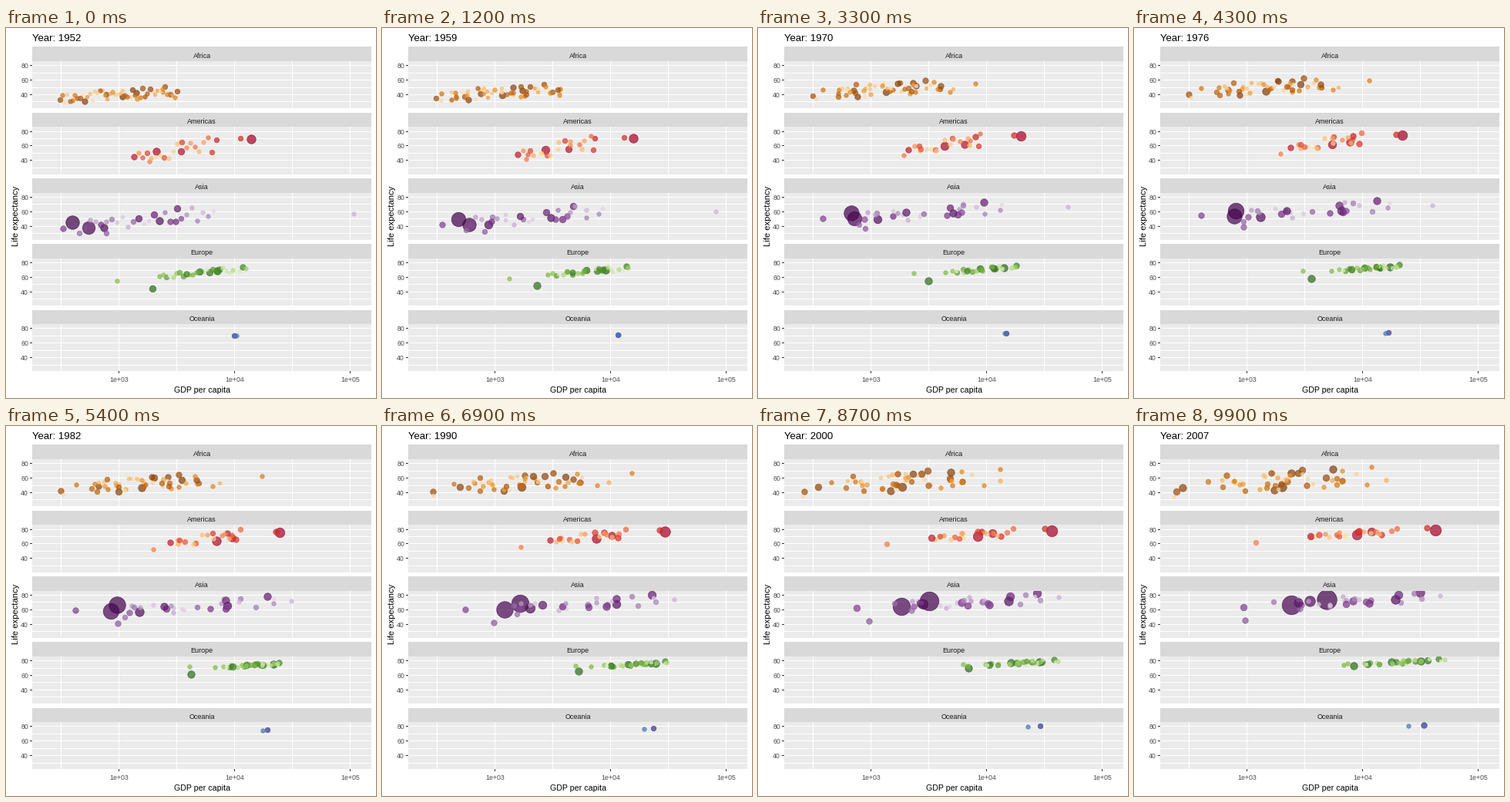
Write a matplotlib script that moves like this. It is 480x480 px and loops after 10000 ms.

```python
import numpy as np
import matplotlib.pyplot as plt
from matplotlib.animation import FuncAnimation
from matplotlib.colors import LinearSegmentedColormap
from matplotlib.patches import Rectangle

plt.rcParams["font.family"] = "Liberation Sans"
FRAMES, INTERVAL = 100, 100
KEYS = (1952, 1982, 2007)
START, END = KEYS[0], KEYS[-1]

LEFT, WIDTH = 34, 440.4
TOP, STRIP, PANEL, PITCH = 24.4, 18.6, 61.2, 85.3
BOTTOM = TOP + 4 * PITCH + STRIP + PANEL
X0, XSPAN = 2.2487, 2.9401      # log10 of GDP
YMAX, YSPAN = 85.55, 64.9       # years of life

rng = np.random.default_rng(7)
fig = plt.figure(figsize=(480 / 72, 480 / 72), dpi=72, facecolor="white")
ax = fig.add_axes([0, 0, 1, 1])
ax.set_xlim(0, 480)
ax.set_ylim(480, 0)
ax.axis("off")


def px(log_gdp):
    return LEFT + (log_gdp - X0) / XSPAN * WIDTH


def py(life, top):
    return top + (YMAX - life) / YSPAN * PANEL


def box(x0, y0, x1, y1, color):
    x0, y0, x1, y1 = (round(v) for v in (x0, y0, x1, y1))
    return ax.add_patch(Rectangle((x0, y0), x1 - x0, y1 - y0, fc=color, lw=0))


def text(x, y, s, size, color="black", ha="center", **kw):
    return ax.text(x, y, s, fontsize=size, color=color, ha=ha, va="baseline", **kw)


def spread(n):
    """Evenly spaced values of unit deviation in random order."""
    return rng.permutation(np.linspace(-1.7, 1.7, n))


def mix(a, b, share):
    return share * a + np.sqrt(1 - share ** 2) * b


def crowd(n, pops, gdp, gdp_dev, life, life_dev, link):
    """Random countries whose wealth and health drift with the continent."""
    if not n:
        return np.empty((0, 7))
    first, last, noise = spread(n), spread(n), spread(n)
    last = mix(first, last, 0.8)
    wealth = np.column_stack([first, (first + last) / 1.9, last])
    health = mix(wealth, noise[:, None], link)
    log_gdp = np.array(gdp) + wealth * gdp_dev
    years = np.minimum(np.array(life) + health * life_dev, 82)
    pop = rng.permutation(np.geomspace(*pops, n))
    return np.column_stack([pop, 10 ** log_gdp, years])


class Panel:
    """One facet: strip, grid and the dots of a continent."""

    def __init__(self, row, name, ramp, growth, leaders, n=0, **rule):
        strip = TOP + row * PITCH
        self.top = strip + STRIP
        self.draw_grid(strip, name)
        data = np.array(leaders, float)
        if n:
            data = np.vstack([data, crowd(n, **rule)])
        self.pop, self.growth = data[:, 0], growth
        self.gdp, self.life = np.log10(data[:, 1:4]), data[:, 4:]
        rank = (-self.pop).argsort().argsort()
        shades = LinearSegmentedColormap.from_list(name, ramp, N=512)
        colors = shades(rank / (len(rank) - 1))
        colors[:, 3] = 0.7
        self.dots = ax.scatter(rank, rank, facecolors=colors, edgecolors=colors,
                               linewidths=0.8, zorder=5)
        self.dots.set_clip_path(self.area)

    def draw_grid(self, strip, name):
        top, right = self.top, LEFT + WIDTH
        box(LEFT, strip, right, top, "#D9D9D9")
        self.area = box(LEFT, top, right, top + PANEL, "#EBEBEB")
        for v in np.arange(2.5, 5.5, 0.5):
            x = int(px(v))
            box(x, top, x + 1, top + PANEL, "white")
        for v in range(30, 90, 10):
            y = round(py(v, top))
            box(LEFT, y, right, y + 1, "white")
            if v % 20 == 0:
                box(LEFT - 3, y, LEFT, y + 1, "#333333")
                text(29, y + 3.7, str(v), 8.8, "#4D4D4D", "right")
        text(LEFT + WIDTH / 2, strip + 14.2, name, 9, "#1A1A1A")

    def update(self, year):
        weights = [np.interp(year, KEYS, row) for row in np.eye(3)]
        pop = self.pop * self.growth ** ((year - END) / (END - START))
        size = 2 + 10 * np.sqrt(pop / 1319)
        d = np.floor(0.75 * (size * 2.845 + 0.945) + 0.5)
        pos = np.column_stack([px(self.gdp @ weights), py(self.life @ weights, self.top)])
        self.dots.set_offsets(np.floor(pos) + 0.5)
        self.dots.set_sizes((d - 0.5) ** 2)


# Leaders: population in millions, then GDP and life expectancy at KEYS
panels = [
    Panel(0, "Africa", ["#7F3B08", "#B35806", "#E08214", "#FDB863", "#FEE0B6"], 3.8,
          [(135, 1077, 1577, 2014, 36, 46, 47),
           (80, 1419, 3504, 5581, 42, 56, 71),
           (65, 781, 674, 278, 39, 48, 46),
           (6, 2388, 17364, 12057, 43, 62, 74)],
          n=48, pops=(76, 0.2), gdp=(3, 3.2, 3.3), gdp_dev=(0.3, 0.34, 0.41),
          life=(39, 51.5, 55), life_dev=(5, 6.5, 9), link=0.5),
    Panel(1, "Americas", ["#A50026", "#D73027", "#F46D43", "#FDAE61", "#FEE090"], 2.2,
          [(301, 13990, 25010, 42952, 68, 75, 78),
           (190, 2109, 7031, 9066, 51, 63, 72),
           (109, 3478, 9611, 11978, 51, 67, 76),
           (33, 11367, 22899, 36319, 69, 76, 81),
           (8.5, 1840, 2011, 1202, 38, 51, 61)],
          n=20, pops=(44, 1), gdp=(3.49, 3.75, 3.89), gdp_dev=(0.21, 0.18, 0.22),
          life=(53, 66.5, 73), life_dev=(8, 5, 3), link=0.65),
    Panel(2, "Asia", ["#40004B", "#762A83", "#9970AB", "#C2A5CF", "#E7D4E8"], 2.6,
          [(1319, 400, 962, 4959, 44, 65, 73),
           (1110, 547, 856, 2452, 37, 57, 65),
           (224, 750, 1517, 3541, 37, 56, 71),
           (127, 3217, 19384, 31656, 63, 77, 83),
           (48, 331, 424, 944, 36, 58, 62),
           (32, 779, 978, 975, 29, 40, 44),
           (2.5, 108382, 31354, 47307, 56, 71, 78)],
          n=26, pops=(160, 0.7), gdp=(3.24, 3.66, 3.88), gdp_dev=(0.34, 0.44, 0.46),
          life=(48, 63.5, 71), life_dev=(8, 7, 6), link=0.75),
    Panel(3, "Europe", ["#276419", "#4D9221", "#7FBC41", "#B8E186", "#E6F5D0"], 1.2,
          [(82, 7144, 22032, 32170, 68, 74, 79),
           (71, 1969, 4241, 8458, 44, 61, 72),
           (4.5, 974, 4127, 7446, 54, 71, 75)],
          n=27, pops=(61, 0.3), gdp=(3.73, 4.15, 4.35), gdp_dev=(0.22, 0.15, 0.22),
          life=(66, 73, 77.5), life_dev=(4, 2, 2.5), link=0.85),
    Panel(4, "Oceania", ["#313695", "#4575B4"], 2.3,
          [(20, 10040, 19477, 34435, 69, 75, 81),
           (4, 10557, 17632, 25185, 69, 74, 80)]),
]

for power in (3, 4, 5):
    x = int(px(power))
    box(x, BOTTOM, x + 1, BOTTOM + 3, "#333333")
    text(x + 0.5, 459, f"1e+0{power}", 8.8, "#4D4D4D")
text(LEFT + WIDTH / 2, 473, "GDP per capita", 10.6)
text(15.5, 244, "Life expectancy", 11.2, rotation=90, rotation_mode="anchor")
title = text(LEFT, 17, "", 13.2, ha="left")


def update(frame):
    year = START + (END - START) * frame / (FRAMES - 1)
    title.set_text(f"Year: {round(year)}")
    for panel in panels:
        panel.update(year)
    return [title] + [panel.dots for panel in panels]


anim = FuncAnimation(fig, update, frames=FRAMES, interval=INTERVAL, repeat=True)
plt.show()
```
